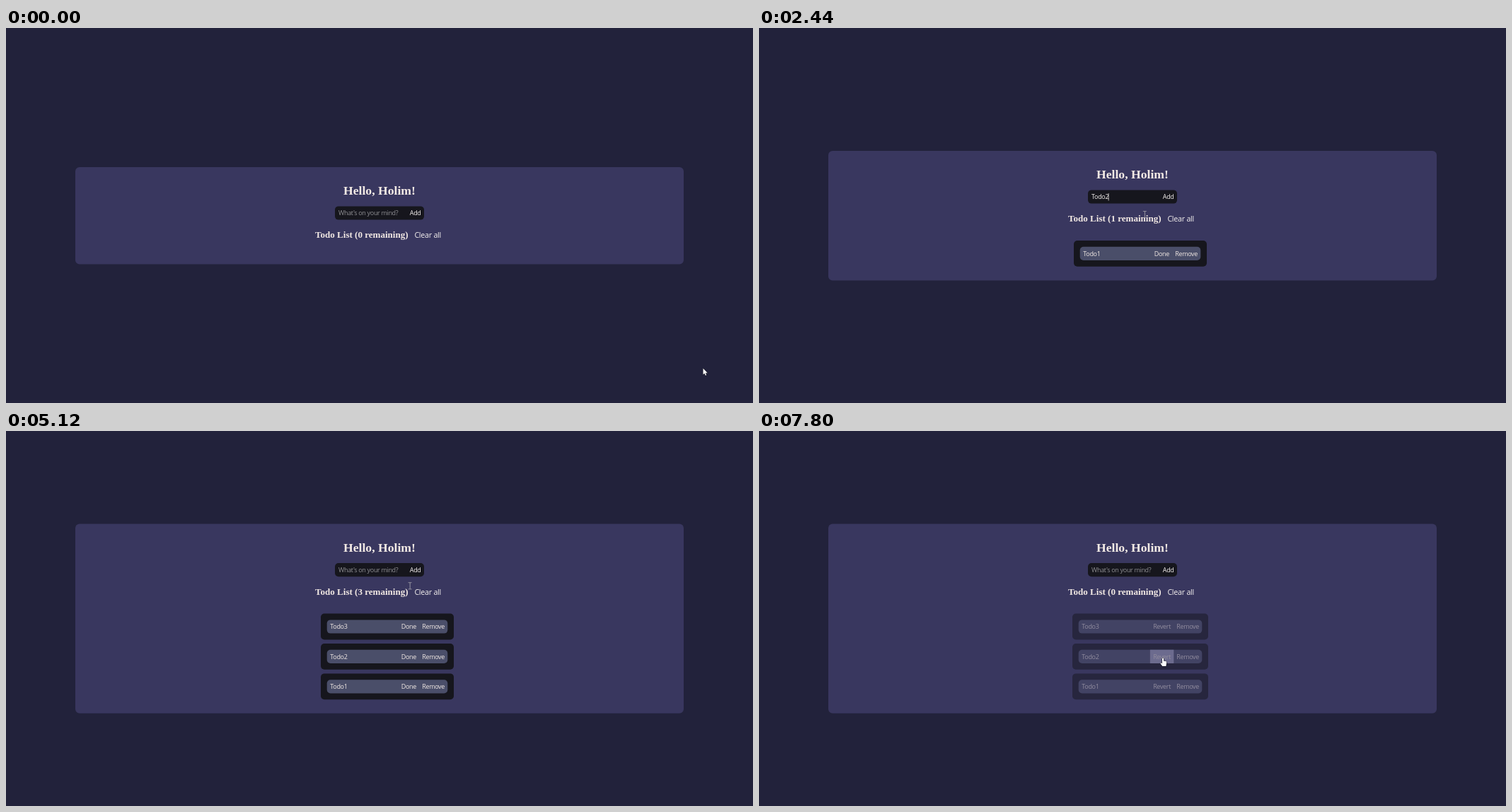
Write an HTML page with a canvas that moves like this. It is 1056x531 px and loops after 8000 ms.

```html
<!DOCTYPE html>
<html lang="en">
<head>
<meta charset="utf-8">
<title>Todo list</title>
<style>
  html, body { margin: 0; width: 100%; height: 100%; overflow: hidden; background: #22223b; }
  canvas { display: block; }
</style>
</head>
<body>
<canvas width="1056" height="531"></canvas>
<script>
const ctx = document.querySelector('canvas').getContext('2d');
const LOOP = 8000, STEP = 40;
const SANS = '"Open Sans", sans-serif', SERIF = '"Liberation Serif", serif';
const WHITE = '#f5f1ef', DARK = '#16161d', PANEL = '#39375f';
const ACTIVE = { box: DARK, row: '#4a4e69', text: '#f2e9e4', hover: '#9f9fbd' };
const FINISHED = { box: '#27263e', row: '#424364', text: '#918c9e', hover: '#6c6b8e' };

// Key press times for each entry, then the moment it joins the list
const entries = [
  { name: 'Todo1', keys: [840, 960, 1040, 1120, 1240], added: 1320, done: 6680 },
  { name: 'Todo2', keys: [1960, 2040, 2080, 2160, 2360], added: 2760, done: 7720 },
  { name: 'Todo3', keys: [3600, 3720, 3800, 3960, 4200], added: 4800, done: 6080 }
];
const caretSpans = [[520, 1800], [1960, 2640], [3280, 4640]];

// Pointer stops: time, x, y
const stops = [
  [0, 985.5, 482], [520, 544, 265], [2400, 544, 265], [2720, 575, 243],
  [2960, 575, 243], [3160, 538, 236], [3280, 538, 218.5], [4400, 538, 218.5],
  [4640, 571, 217.5], [5080, 571, 217.5], [5320, 572, 242], [5480, 592, 272],
  [5800, 571, 279], [6080, 571, 279], [6360, 575, 382], [6520, 571, 364],
  [6640, 571, 364], [6880, 524, 284], [7040, 515, 224], [7200, 515, 224],
  [7640, 571, 321], [LOOP, 571, 321]
];
const ARROW = new Path2D('M0 0V8.8L2 7 3.3 10 4.7 9.4 3.4 6.5H6.2Z');
const HAND = new Path2D('M-1 1Q0-.6 1 1V4.4L4.2 5.1Q5.4 5.5 5.2 7L4.4 12H-.8L-3.5 8.2Q-3.4 6.8-2 7.4L-1 8.2Z');

let pointer, pointerKind;

function pointerAt(t) {
  const i = stops.findIndex(s => s[0] > t);
  const [t0, x0, y0] = stops[i - 1], [t1, x1, y1] = stops[i];
  const u = (t - t0) / (t1 - t0), k = u * u * (3 - 2 * u);
  return { x: x0 + (x1 - x0) * k, y: y0 + (y1 - y0) * k };
}

function box(x, y, w, h, fill, radius = 5) {
  ctx.fillStyle = fill;
  ctx.beginPath();
  ctx.roundRect(x, y, w, h, radius);
  ctx.fill();
}

function setSans(size = 9) {
  ctx.font = `${size}px ${SANS}`;
  ctx.letterSpacing = size > 10 ? '-0.25px' : '-0.33px';
}

function label(text, x, middle, color, size = 9) {
  setSans(size);
  ctx.fillStyle = color;
  ctx.fillText(text, x, middle + size * .36);
}

function heading(text, x, baseline, size) {
  ctx.font = `bold ${size}px ${SERIF}`;
  ctx.letterSpacing = '0px';
  ctx.fillStyle = '#f2e9e4';
  ctx.fillText(text, x, baseline);
}

function hit(x, y, w, h, kind) {
  const inside = pointer.x >= x && pointer.x < x + w && pointer.y >= y && pointer.y < y + h;
  if (inside) pointerKind = kind;
  return inside;
}

function button(text, right, middle, color, hover, { size = 9, pad = 4.3, radius = 0 } = {}) {
  setSans(size);
  const w = ctx.measureText(text).width, x = right - w;
  const area = [x - pad, middle - 9.6, w + 2 * pad, 19.2];
  if (hit(...area, 'hand') && hover) box(...area, hover, radius);
  label(text, x, middle, color, size);
}

function drawInput(t, top, shown) {
  const middle = top + 65;
  box(465, middle - 9.6, 126, 19.2, DARK);
  hit(465, middle - 9.6, 102, 19.2, 'beam');
  const current = entries.find(e => t >= e.keys[0] && t < e.added);
  const text = current ? current.name.slice(0, current.keys.filter(k => k <= t).length) : '';
  label(text || "What's on your mind?", 470, middle, text ? WHITE : '#8f8f93');
  if (caretSpans.some(([from, to]) => t >= from && t < to)) {
    ctx.fillStyle = WHITE;
    ctx.fillRect(469.5 + ctx.measureText(text).width * (text ? 1 : 0), middle - 5, .7, 10.5);
  }
  button('Add', 586.5, middle, WHITE, '#2f2031', { radius: [0, 5, 5, 0] });
  return current && t > current.keys[0] && t <= current.keys[4] && shown.length > 0;
}

function drawItem(entry, y, t, wide) {
  const done = t >= entry.done, c = done ? FINISHED : ACTIVE;
  const left = wide ? 443 : 445, right = 1078 - left, middle = y + 18.4;
  box(left, y, right - left, 36.8, c.box);
  box(left + 8.7, middle - 9.6, right - left - 17.4, 19.2, c.row);
  hit(left + 13.3, middle - 6, 23, 12, 'beam');
  label(entry.name, left + 13.3, middle, c.text);
  button(done ? 'Revert' : 'Done', right - 53, middle, c.text, c.hover);
  button('Remove', right - 13, middle, c.text, c.hover, { radius: [0, 5, 5, 0] });
}

function drawSuggestions(top, shown) {
  const y = top + 74.8, h = shown.length * 16.5 + 1;
  box(465, y, 102, h, '#fff', 0);
  hit(465, y, 102, h, 'arrow');
  shown.forEach((e, i) => label(e.name, 470, y + 8.7 + i * 16.5, '#15141a'));
}

function drawPointer() {
  ctx.save();
  ctx.translate(pointer.x, pointer.y);
  if (pointerKind === 'beam') {
    ctx.fillStyle = '#a09fa8';
    ctx.fillRect(-.4, -4.5, .9, 9);
    for (const y of [-5, 4.2]) ctx.fillRect(-2.5, y, 5, .8);
  } else {
    const shape = pointerKind === 'hand' ? HAND : ARROW;
    ctx.strokeStyle = '#111118';
    ctx.lineWidth = 1;
    ctx.stroke(shape);
    ctx.fillStyle = '#fff';
    ctx.fill(shape);
  }
  ctx.restore();
}

function draw(t) {
  pointer = pointerAt(t);
  pointerKind = 'arrow';
  const shown = entries.filter(e => t >= e.added).reverse();
  const remaining = shown.filter(e => t < e.done).length;
  const height = shown.length ? 141 + 42.4 * shown.length : 137.4;
  const top = 265.7 - height / 2;

  ctx.fillStyle = '#22223b';
  ctx.fillRect(0, 0, 1056, 531);
  box(98, top, 860, height, PANEL, 6);
  heading('Hello, Holim!', 477, top + 39.2, 17.65);
  hit(477, top + 23, 102, 20, 'beam');
  heading(`Todo List (${remaining} remaining)`, 437, top + 100.3, 13.05);
  hit(437, top + 87.3, 140, 18, 'beam');
  button('Clear all', 615, top + 96.3, WHITE, null, { size: 10.7, pad: 0 });
  const suggesting = drawInput(t, top, shown);
  shown.forEach((e, i) => drawItem(e, top + 127 + 42.4 * i, t, remaining < shown.length));
  if (suggesting) drawSuggestions(top, shown);
  drawPointer();
}

const start = performance.now();
function frame() {
  const t = (performance.now() - start) % LOOP;
  draw(Math.floor(t / STEP) * STEP);
  requestAnimationFrame(frame);
}
frame();
</script>
</body>
</html>
```
